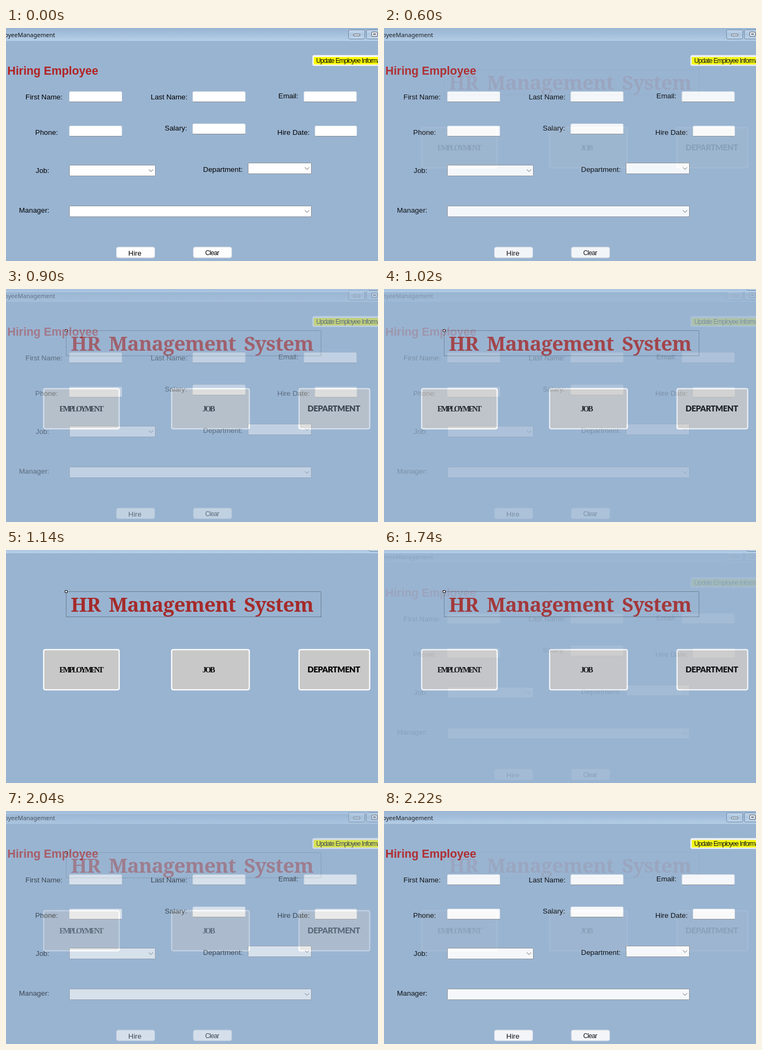
An HTML page with a canvas for the animation above (2.28 s loop, 689 by 434 pixels).

```html
<!DOCTYPE html>
<html lang="en">
<head>
<meta charset="utf-8">
<title>Employee management</title>
<style>
html, body { margin: 0; width: 100%; height: 100%; overflow: hidden; background: #99b4d1; }
canvas { display: block; width: 689px; height: 434px; }
</style>
</head>
<body>
<canvas id="stage"></canvas>
<script>
const W = 689, H = 434, LOOP = 2280, HALF = LOOP / 2, HOLD = 600, STEP = 60;
const BACK = '#99b4d1';
const SANS = '"Liberation Sans", Arial, sans-serif';
const LABEL = `13.33px ${SANS}`;
const ratio = window.devicePixelRatio || 1;

function setup(canvas) {
  canvas.width = W * ratio;
  canvas.height = H * ratio;
  const c = canvas.getContext('2d');
  c.scale(ratio, ratio);
  return c;
}

function text(c, str, x, y, font = LABEL, color = '#000', spacing = 0, align = 'left') {
  c.font = font;
  c.fillStyle = color;
  c.letterSpacing = spacing + 'px';
  c.textAlign = align;
  c.fillText(str, x, y);
}

function box(c, x, y, w, h, r, fill, stroke, line = 1) {
  c.beginPath();
  c.roundRect(x, y, w, h, r);
  c.fillStyle = fill;
  c.fill();
  if (!stroke) return;
  c.strokeStyle = stroke;
  c.lineWidth = line;
  c.stroke();
}

function gradient(c, top, bottom, ...stops) {
  const g = c.createLinearGradient(0, top, 0, bottom);
  stops.forEach((s, i) => g.addColorStop(i / (stops.length - 1), s));
  return g;
}

function field(c, x, y, w) {
  box(c, x + 0.5, y + 0.5, w - 1, 19, 2, '#fff', '#e4e8ec');
  c.fillStyle = '#868b92';
  c.fillRect(x + 1, y + 19, w - 2, 1);
}

function combo(c, x, y, w) {
  box(c, x + 0.5, y + 0.5, w - 1, 20, 0.5, '#fff', '#8c9299');
  const cx = x + w - 8.5;
  c.beginPath();
  c.moveTo(cx - 4, y + 8.5);
  c.lineTo(cx, y + 12.5);
  c.lineTo(cx + 4, y + 8.5);
  c.strokeStyle = '#555';
  c.stroke();
}

function windowButton(c, x, y, w, h) {
  box(c, x + 0.5, y + 0.5, w, h, 2.5, gradient(c, y, y + h, '#c6daee', '#b0c8e0', '#bfd5ec'), '#6f87a2');
}

function drawForm(c) {
  c.fillStyle = BACK;
  c.fillRect(0, 0, W, H);
  c.fillStyle = gradient(c, 0, 24, '#98b4d2', '#a6c1dd', '#b7d0e9');
  c.fillRect(0, 0, W, 24);
  text(c, 'EmployeeManagement', 91, 17, '11px "Noto Sans", "Open Sans", sans-serif', '#111', 0, 'right');

  windowButton(c, 634, 3, 30, 17);
  windowButton(c, 667, 3, 30, 17);
  box(c, 643.5, 11.5, 12, 3, 0.5, '#fff', '#4c5663');
  box(c, 677.5, 7.5, 10, 8, 0.5, '#fff', '#4c5663');
  box(c, 680.5, 10.5, 4, 2, 0, '#b0c8e0', '#4c5663');

  text(c, 'Hiring Employee', 2.5, 86.5, `bold 21.33px ${SANS}`, '#b22222');

  box(c, 567.5, 50.5, 140, 20, 3.5, '#f8f9fa');
  box(c, 570, 54, 140, 14, 0, '#ff0');
  text(c, 'Update Employee Information', 574.5, 65, `12px ${SANS}`, '#000', -0.9);

  [['First Name:', 36, 133], ['Last Name:', 268, 133], ['Email:', 504.5, 130.5],
   ['Phone:', 54, 198.5], ['Salary:', 294, 190.5], ['Hire Date:', 502.5, 198.5],
   ['Job:', 55, 269.5], ['Department:', 365, 268], ['Manager:', 24, 343.5]]
    .forEach(([s, x, y]) => text(c, s, x, y));

  [[117, 118, 98], [345.5, 118, 98], [551.5, 118, 98],
   [117, 182, 98], [345.5, 178, 98], [572, 182, 78]]
    .forEach(f => field(c, ...f));

  combo(c, 117, 255, 160);
  combo(c, 448, 251, 118);
  combo(c, 117, 331, 449);

  box(c, 204.5, 408, 71, 20, 3.5, '#fdfdfd', '#d5dbe2');
  box(c, 347, 408, 71, 20, 3.5, '#fdfdfd', '#d5dbe2');
  text(c, 'Hire', 226.5, 423.5);
  text(c, 'Clear', 369, 422.5, `12px ${SANS}`, '#000', -0.7);
}

function drawMenu(c) {
  c.fillStyle = BACK;
  c.fillRect(0, 0, W, H);
  c.fillStyle = gradient(c, 0, 6, '#acc8e3', '#b7d1ea');
  c.fillRect(0, 0, W, 6);
  box(c, 672.5, -8.5, 30, 11, 2, '#bcd3ea', '#6f87a2');

  c.wordSpacing = '6.5px';
  text(c, 'HR Management System', 120, 114.5, 'bold 37px "Noto Serif", serif', '#a52a2a', -0.8);
  c.wordSpacing = '0px';

  c.setLineDash([1, 1]);
  c.lineDashOffset = 0.5;
  c.lineWidth = 1;
  c.strokeStyle = '#3a4450';
  c.strokeRect(111.5, 77.5, 472, 47);
  c.setLineDash([]);
  box(c, 109.5, 75.5, 4, 4, 0, '#fff', '#000');

  [[69, 141], [306, 145], [542, 132]].forEach(([x, w]) =>
    box(c, x + 0.8, 185.7, w - 1.2, 74.6, 3, '#c8c8c8', '#fff', 2.2));
  const narrow = 'bold 14px "Liberation Serif", serif';
  text(c, 'EMPLOYMENT', 99, 228, narrow, '#000', -2.4);
  text(c, 'JOB', 364, 228, narrow, '#000', -2);
  text(c, 'DEPARTMENT', 558.5, 228, '900 15px Lato, sans-serif', '#000', -0.5);
}

function layer(draw) {
  const canvas = document.createElement('canvas');
  draw(setup(canvas));
  return canvas;
}

const stage = setup(document.getElementById('stage'));
const form = layer(drawForm), menu = layer(drawMenu);

// Each half holds one view, then fades to the other in tenths.
function frame(now) {
  const t = now % LOOP, local = t % HALF;
  const [from, to] = t < HALF ? [form, menu] : [menu, form];
  const mix = local < HOLD ? 0 : (Math.floor((local - HOLD) / STEP) + 1) / 10;
  stage.globalAlpha = 1;
  stage.drawImage(from, 0, 0, W, H);
  stage.globalAlpha = mix;
  stage.drawImage(to, 0, 0, W, H);
  requestAnimationFrame(frame);
}
requestAnimationFrame(frame);
</script>
</body>
</html>
```
